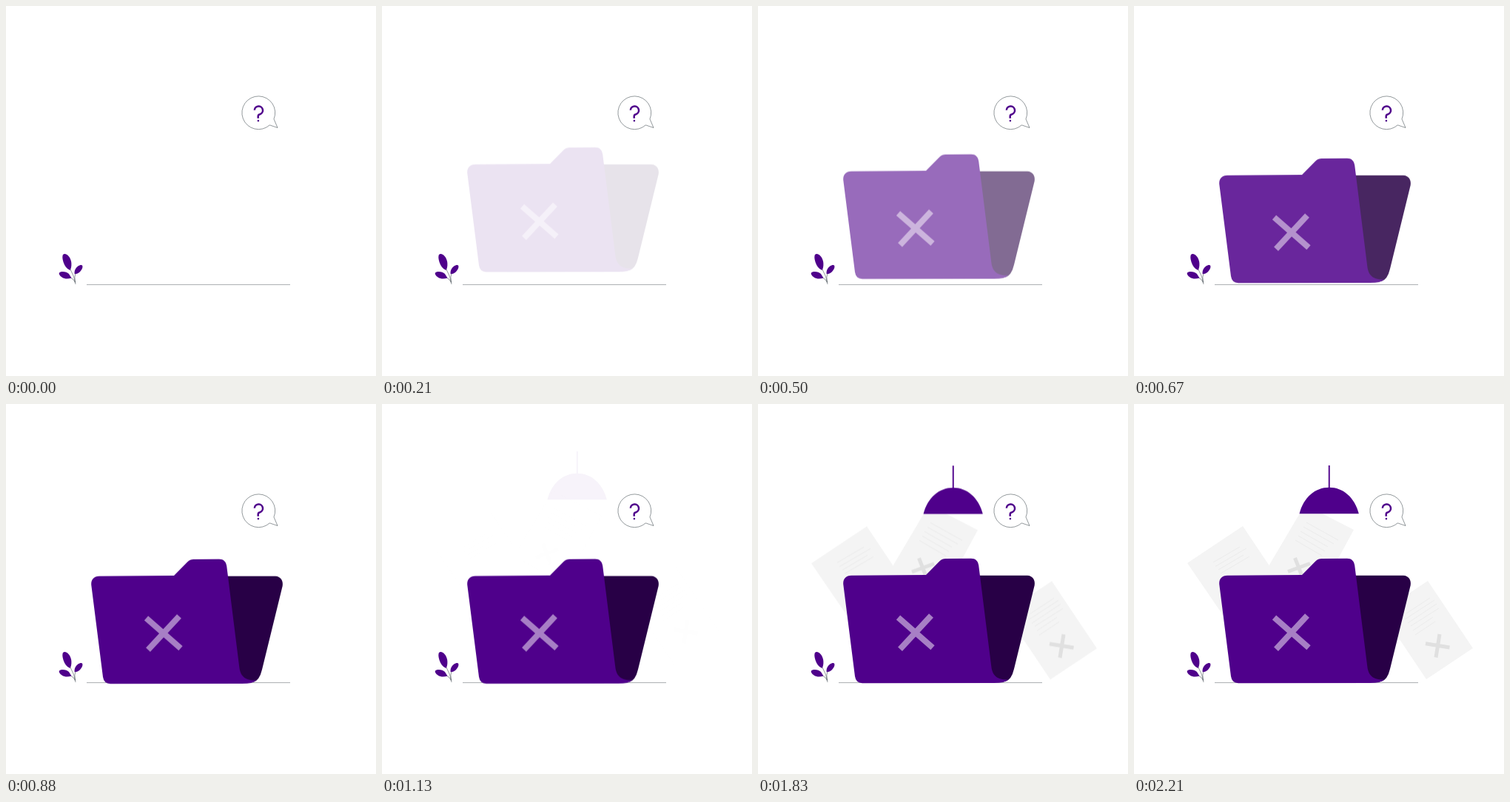
An HTML page for the animation above (2.25 s loop, 500x500 px).

```html
<!DOCTYPE html>
<html lang="en">
<head>
<meta charset="utf-8">
<title>Empty folder</title>
<style>
  html, body { margin: 0; width: 100%; height: 100%; overflow: hidden; background: #fff; }
  svg { display: block; width: 100vw; height: 100vh; }

  .main { fill: #4f008b; }
  .dark { fill: #280046; }
  .sheet { fill: #f4f4f4; }
  .rule { fill: none; stroke: #e9e9e9; stroke-width: .8; }
  .cross { fill: none; stroke: #e0e0e0; stroke-width: 5; }
  .thin { fill: none; stroke: #263238; stroke-width: .5; }

  .folder { animation: drop-first 2250ms infinite; }
  .late { animation: drop-second 2250ms infinite; }
  .gate { animation: gate 2250ms step-end infinite; }

  /* Both drops overshoot slightly before they settle. */
  @keyframes drop-first {
    0% { opacity: 0; transform: translateY(-20px); animation-timing-function: cubic-bezier(.36, -.01, .5, 1.38); }
    53%, 100% { opacity: 1; transform: none; }
  }
  @keyframes drop-second {
    0%, 43.9% { opacity: 0; transform: translateY(-20px); animation-timing-function: cubic-bezier(.36, -.01, .5, 1.38); }
    97.3%, 100% { opacity: 1; transform: none; }
  }
  @keyframes gate {
    0% { visibility: hidden; }
    7.4%, 100% { visibility: visible; }
  }
</style>
</head>
<body>
<svg viewBox="0 0 500 500">
  <path d="M109 376.6H384" fill="none" stroke="#263238" stroke-width=".4"/>

  <g class="plant">
    <path class="thin" d="M86.500 355Q93 366 94 376M87 367Q92 369 93.700 374M94 361Q92 366 93.500 373"/>
    <path class="main" d="M77 336C80 333 86 337 88 345C89 350 88 355 86.500 357C82 355 79 351 77.500 346C76 341 76 338 77 336Z"/>
    <path class="main" d="M72 360.500C75 358 82 359 85 362L88.500 367.500C84 369 79 369 75.500 366.500C72.500 364.500 71 362 72 360.500Z"/>
    <path class="main" d="M103 350.500C104.500 353 102 357.500 99 360C97 361.500 95 362.200 92.700 362.200C92 358 94 354 97 351.800C99.500 350 102 349.500 103 350.500Z"/>
  </g>

  <g class="late">
    <path class="sheet" d="M147 165L72 215L133 304L208 256Z"/>
    <path class="rule" d="M107 214L143 193M110 219.500L152 195M114 224L148 204M117 229L156 206"/>
    <path class="sheet" d="M231 136L297 170L246 264L179 224Z"/>
    <path class="rule" d="M233 160L276 184M229 166L270 189M225 172L262 193M222 178L258 199M218 184L254 205"/>
    <path class="cross" d="M208 226.500L238 215.500M217.500 208L228 235"/>
    <path class="sheet" d="M397 239L458 330L395 372L334 281Z"/>
    <path class="rule" d="M368 283L400 262M366 291L406 265M370 296L409 270M374 300L412 276M377 306L404 288M380 312L407 294"/>
    <path class="cross" d="M394 323.800L426.500 329M413 311L408 342.500"/>
  </g>

  <g class="late main">
    <path d="M262.800 83h1.900v31h-1.900z"/>
    <path d="M223.500 148.300C229 126 245 112.800 263.700 112.800S298 126 303.800 148.300Z"/>
  </g>

  <g class="gate">
    <g class="folder">
      <path class="dark" d="M290 231.800H364C371 232 375 238 373.700 245L346 358Q342.500 373 334 375L312 372Z"/>
      <path class="main" d="M126 231.700L227 231L245.500 212.300Q249 209 253.500 209L288 208.700C294 208.700 297.300 212 298.200 218L315.200 354C316.500 366 322 373 338 372.500Q334 377 319 377L141 377.300Q132.300 377 131 368L115.300 244C114.500 236.500 118.500 232 126 231.700Z"/>
      <path d="M189.500 288.500L236 329.300M234 286L192 331.200" fill="none" stroke="#a77fc5" stroke-width="8"/>
    </g>
  </g>

  <g class="bubble">
    <path class="thin" d="M362 152.800L367 164.500L356.300 160.900A22.400 22.400 0 1 1 362 152.800Z"/>
    <path d="M335.800 140.800A5.600 5.600 0 1 1 343.500 146.200Q340.700 146.700 340.700 149V151.800" fill="none" stroke="#4f008b" stroke-width="2.500"/>
    <circle class="main" cx="340.900" cy="155.100" r="1.300"/>
  </g>
</svg>
</body>
</html>
```
